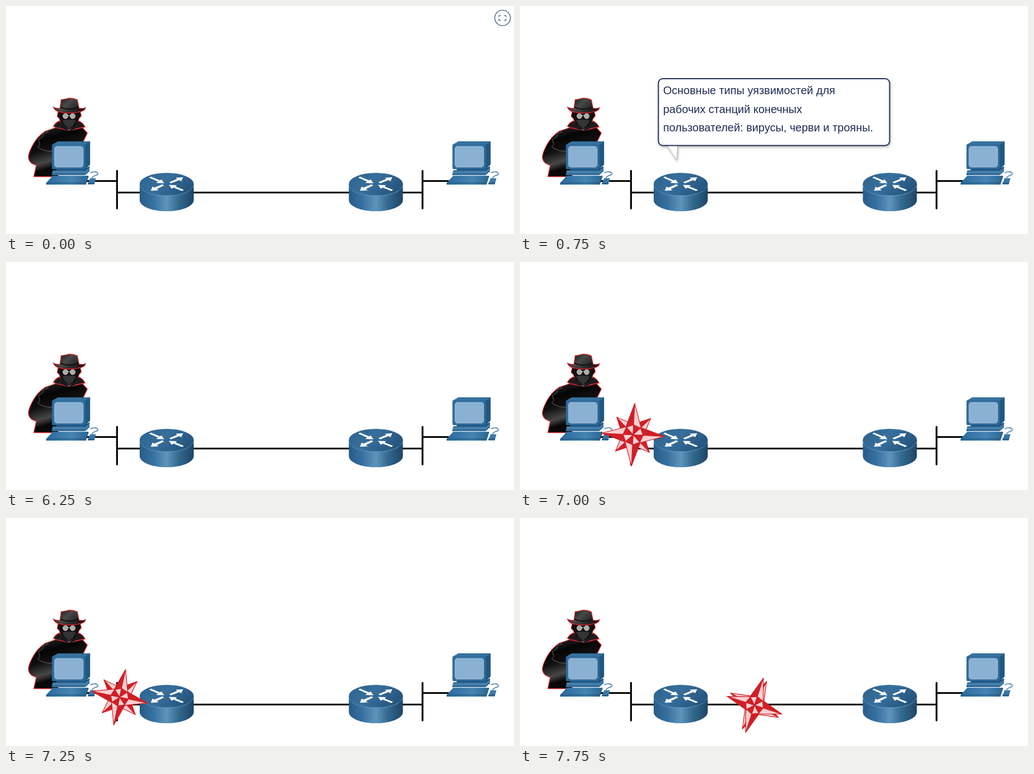
Animation, 912 px wide and 411 px high, one loop 8000 ms. Source, as an HTML page:

```html
<!DOCTYPE html>
<html lang="ru">
<head>
<meta charset="utf-8">
<style>
  html, body { margin: 0; width: 100%; height: 100%; overflow: hidden; background: #fff; }
  svg { display: block; width: 100%; height: 100%; }
  text { font: 20px "Liberation Sans", Arial, sans-serif; fill: #1e2c55; }
</style>
</head>
<body>
<svg viewBox="0 0 912 411" xmlns="http://www.w3.org/2000/svg">
  <defs>
    <linearGradient id="side">
      <stop offset="0" stop-color="#285c87"/>
      <stop offset=".25" stop-color="#3670a0"/>
      <stop offset=".5" stop-color="#5f95bb"/>
      <stop offset=".72" stop-color="#33698f"/>
      <stop offset="1" stop-color="#1d4566"/>
    </linearGradient>
    <linearGradient id="lid" x2="1" y2=".4">
      <stop offset="0" stop-color="#2b618d"/>
      <stop offset=".5" stop-color="#376f9b"/>
      <stop offset="1" stop-color="#265780"/>
    </linearGradient>
    <linearGradient id="keys" x2="1" y2="0">
      <stop offset="0" stop-color="#2b6a9b"/>
      <stop offset=".6" stop-color="#4585b4"/>
      <stop offset="1" stop-color="#2a6592"/>
    </linearGradient>
    <linearGradient id="coat" x1="0" y1="0" x2=".35" y2="1">
      <stop offset="0" stop-color="#333"/>
      <stop offset=".3" stop-color="#050505"/>
      <stop offset=".5" stop-color="#111"/>
      <stop offset=".72" stop-color="#484848"/>
      <stop offset=".85" stop-color="#080808"/>
    </linearGradient>
    <linearGradient id="felt" x2="1" y2=".5">
      <stop offset="0" stop-color="#0a0a0a"/>
      <stop offset=".5" stop-color="#484848"/>
      <stop offset="1" stop-color="#161616"/>
    </linearGradient>
    <filter id="soft" x="-10%" y="-10%" width="120%" height="130%">
      <feDropShadow dx="1" dy="2" stdDeviation="2" flood-color="#555" flood-opacity=".45"/>
    </filter>

    <g id="router">
      <path d="M240 321V350A48.500 20 0 0 0 337 350V321Z" fill="url(#side)"/>
      <ellipse cx="288.500" cy="321" rx="48.500" ry="20.200" fill="url(#lid)"/>
      <path d="M240.500 323A48 19.500 0 0 0 336.500 323" fill="none" stroke="#6c9ec4" stroke-width=".8"/>
      <g fill="#fff">
        <path d="M257 309.500L260 307.500L276.500 314.500L279 312.500L284 319.500L269.500 319L273 316.500Z"/>
        <path d="M293 317.500L307.500 311.500L304.500 309.500L318 308.800L314.500 316L311 313.800L296 319.800Z"/>
        <path d="M284 323.500L280.500 321.500L266 327.500L263 325.500L260 333L274 332.300L270.500 330Z"/>
        <path d="M292.500 322.500L307 323L304 325.300L319.500 331.500L316 333.500L300.500 327.300L297.500 329.500Z"/>
      </g>
    </g>

    <g id="pc">
      <path d="M83 250L93 244H151V286L142 294Z" fill="#22587f"/>
      <path d="M83 250L93 244.500H151L142 250Z" fill="#3673a1"/>
      <rect x="82.500" y="249.500" width="60" height="44.500" rx="2" fill="#2d6b9b"/>
      <rect x="87" y="253" width="51.500" height="37.500" rx="4.500" fill="#8bb1d2" stroke="#a9c6df" stroke-width=".8"/>
      <path d="M90 294H139L150 289V296L139 301H90Z" fill="#1f5178"/>
      <path d="M84 296H142L150 291V298L142 305H82Z" fill="#336f9d"/>
      <path d="M83 299.500H143L150 293.500" fill="none" stroke="#7eaccd" stroke-width=".8"/>
      <path d="M84 306H148L144 319V322H72V319Z" fill="url(#keys)"/>
      <path d="M72.500 319H144L148 306.500" fill="none" stroke="#1f5075" stroke-width="1"/>
      <path d="M151 301C157 297 166 299 165 303C164 306 154 305 154.500 311" fill="none" stroke="#2d6b9b" stroke-width="1.300"/>
      <path d="M151 310.500H161.500L158.500 321H147Z" fill="#3a78a8"/>
      <path d="M147 318.500H159L158.500 321.500H147Z" fill="#235a83"/>
    </g>
  </defs>

  <rect width="912" height="411" fill="#fff"/>

  <g id="spy" stroke="#d8232a" stroke-width="1.300" stroke-linejoin="round">
    <path fill="url(#coat)" d="M90 219L70 226Q56 236 49 249Q39 267 40.500 275Q42 284 54.500 287L50 307.500H92L134 254L146 229L137 219L114 225Z"/>
    <path fill="#222" d="M85 217Q90 208 98 207L130 207Q138 210 142 218L132 220H93Z"/>
    <path fill="#0b0b0b" d="M94 189L92 199L96 203L99 212H128L131 203L135 198L133 189Z"/>
    <g stroke="none">
      <path fill="#1c1c1c" d="M88 216Q92 210 99 209L113 224L129 209Q136 211 139 217L128 220L114 226L98 220Z"/>
      <path fill="#111" d="M95 189L97 205Q101 216 113 223Q126 216 130 205L132 189Z"/>
      <path fill="#333" d="M101 206Q113 203 125 206Q123 215 113 221Q104 215 101 206Z"/>
    </g>
    <path fill="url(#felt)" d="M85 182Q92 186 97 184L99 169Q106 168 113 166Q121 166 128 169L131 184Q138 186 143 183Q141 190 130 191Q113 195 97 191Q88 190 85 182Z"/>
    <path fill="none" stroke="#111" stroke-width="2.500" d="M97.500 182Q114 190 130.500 182"/>
    <path fill="none" stroke="#666" stroke-width="1" d="M76 227Q66 228 66 235L58 241L61 250L57 254Q66 262 83 262"/>
    <g fill="#aaa" stroke="#d0d0d0" stroke-width="1">
      <circle cx="106.700" cy="198.500" r="4.500"/>
      <circle cx="119.700" cy="198.500" r="4.500"/>
      <path fill="none" d="M111 198Q113 196 115.200 198"/>
    </g>
  </g>

  <path d="M140 315.500H200M200 336.300H748M748 315.500H800" stroke="#000" stroke-width="3"/>
  <path d="M199.300 297V365M747.800 297V365" stroke="#000" stroke-width="3.200" stroke-linecap="round"/>
  <use href="#router"/>
  <use href="#router" x="375.500"/>
  <use href="#pc"/>
  <use href="#pc" x="719"/>

  <g id="expand" fill="none" stroke="#24476c">
    <circle cx="891.500" cy="21.500" r="14" stroke-width="1.200"/>
    <path stroke-width="1.100" d="M885 20V17H888.500M894 17H897.500V20M897.500 23V26H894M888.500 26H885V23"/>
  </g>

  <g id="bubble">
    <g filter="url(#soft)">
      <path d="M263 250L281.500 278L283 250Z" fill="#fff" stroke="#b5b5ba" stroke-width="1"/>
      <rect x="248.500" y="131" width="415" height="120.500" rx="8" fill="#fff" stroke="#24335f" stroke-width="2"/>
    </g>
    <text x="257" y="159">Основные типы уязвимостей для</text>
    <text x="257" y="193">рабочих станций конечных</text>
    <text x="257" y="226">пользователей: вирусы, черви и трояны.</text>
  </g>

  <g id="star" stroke="#d01f27" stroke-width="1.200" stroke-linejoin="round"></g>
</svg>
<script>
const LOOP = 8000, STEP = 250, START = 6750;
const RED = "#d01f27", PINK = "#f8cfd1";
const el = id => document.getElementById(id);

// Each pose: x, y, long radius, long angle, short radius, short angle
const poses = [
  [160, 303.5, 22, 0, 17, 45],
  [203, 311.5, 56.5, 3, 43, 47],
  [204, 323, 51, 12, 42, 48],
  [322.5, 336.5, 55.5, -7, 49, 40],
  [421, 337.5, 51.5, 18, 48, 27]
];

const polar = (r, deg) => {
  const a = deg * Math.PI / 180;
  return [(r * Math.sin(a)).toFixed(2), (-r * Math.cos(a)).toFixed(2)].join();
};

// Four kites, each split lengthwise into two facets
function kites(tip, base, turn, left, right) {
  let out = "";
  for (let a = turn; a < turn + 360; a += 90) {
    for (const [side, fill] of [[-45, left], [45, right]]) {
      out += `<polygon points="0,0 ${polar(tip, a)} ${polar(base, a + side)}" fill="${fill}"/>`;
    }
  }
  return out;
}

// Short spikes, long spikes, then a hub with the facet colours swapped
function starShape(long, longTurn, short, shortTurn) {
  const base = long * 0.34, hub = long * 0.32;
  return kites(short, base, shortTurn, RED, PINK) +
    kites(long, base, longTurn, RED, PINK) +
    kites(hub, hub, longTurn, PINK, RED);
}

const show = (id, on) => el(id).setAttribute("visibility", on ? "visible" : "hidden");
let last = -1;

function render(t) {
  const tick = Math.floor(t / STEP);
  if (tick === last) return;
  last = tick;
  const now = tick * STEP;
  show("expand", now < 500);
  show("bubble", now >= 750 && now < 6250);
  show("star", now >= START);
  if (now < START) return;
  const [x, y, ...shape] = poses[(now - START) / STEP];
  el("star").setAttribute("transform", `translate(${x} ${y})`);
  el("star").innerHTML = starShape(...shape);
}

const begin = performance.now();
function frame() {
  render((performance.now() - begin) % LOOP);
  requestAnimationFrame(frame);
}
frame();
</script>
</body>
</html>
```
